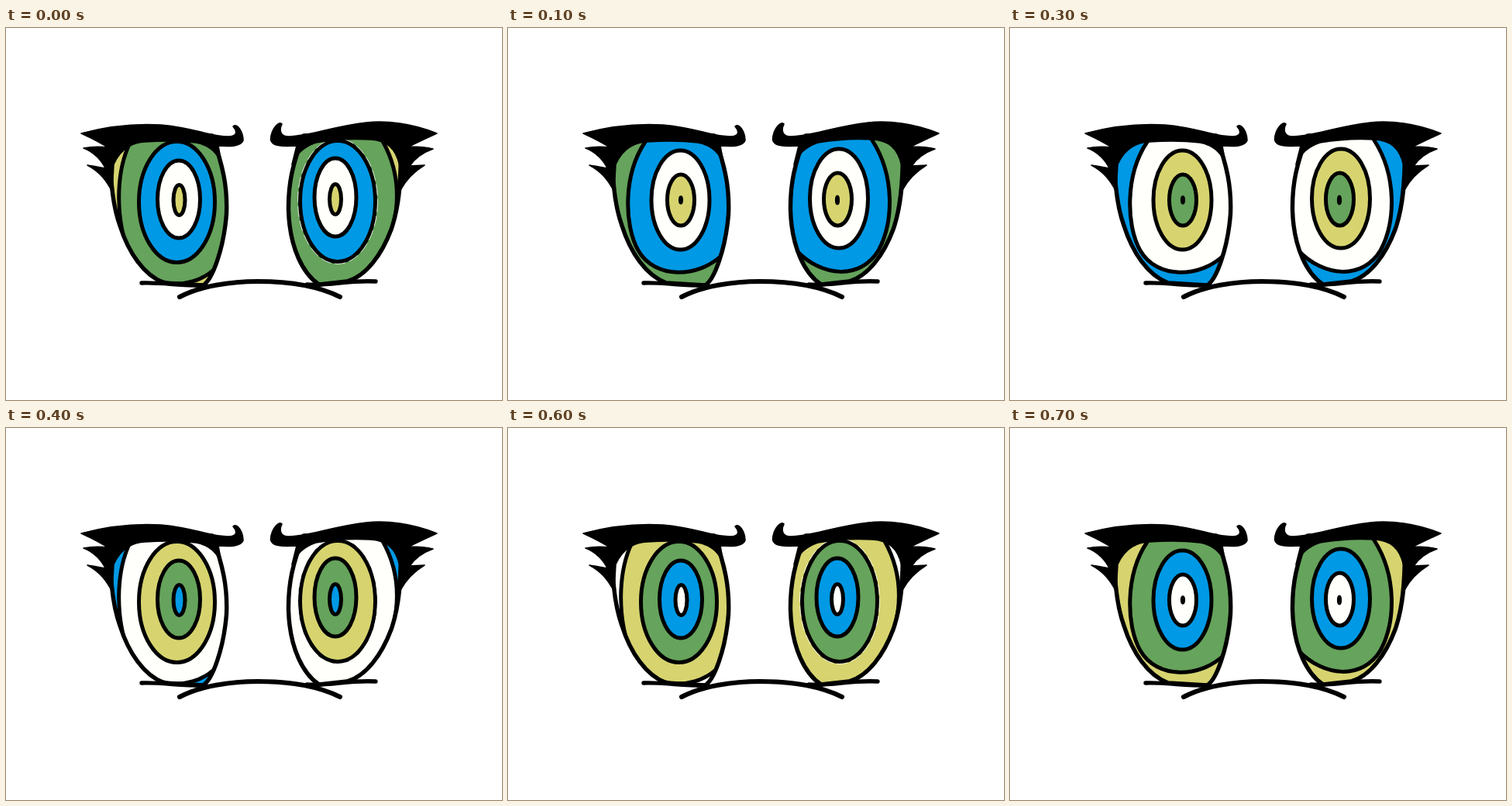
Write an HTML page without scripts that moves like this. It is 640x480 px and loops after 800 ms.

```html
<!DOCTYPE html>
<html lang="en">
<head>
<meta charset="utf-8">
<title>Hypnotic eyes</title>
<style>
  html, body { margin: 0; width: 100%; height: 100%; overflow: hidden; background: #fff; }
  svg { display: block; width: 100vw; height: 100vh; }

  .rings { stroke: #000; stroke-width: 5; }
  .line { fill: none; stroke: #000; stroke-width: 5.4; stroke-linecap: round; stroke-linejoin: round; }
  .lids { stroke: #000; stroke-width: 1.6; stroke-linejoin: round; }
  .base { stroke: none; }
  .glint { fill: none; stroke: #fff; stroke-width: .8; stroke-dasharray: 14 5; }

  /* Two ring poses alternate while the colours travel outwards. */
  .near, .far { animation: blink 200ms step-end infinite; }
  .far { animation-delay: -100ms; }
  @keyframes blink {
    0% { visibility: visible; }
    50%, 100% { visibility: hidden; }
  }

  .c0, .c1, .c2, .c3 { animation: hue 800ms step-end infinite; }
  .c1 { animation-delay: -600ms; }
  .c2 { animation-delay: -400ms; }
  .c3 { animation-delay: -200ms; }
  @keyframes hue {
    0%, 100% { fill: #d7d46f; }
    25% { fill: #66a35c; }
    50% { fill: #0099e5; }
    75% { fill: #fffffb; }
  }
</style>
</head>
<body>
<svg viewBox="0 0 640 480">
  <defs>
    <path id="eyeL" d="M135 139C133 195 138 230 147 255C158 290 178 319 204 329L254 332C266 326 281 285 284.5 240C286 205 280 178 266 139Z"/>
    <path id="eyeR" d="M509 135C511 195 507 232 497 260C485 292 465 320 440 327L404 331C384 318 366 285 364.5 235C364 200 370 175 384 139Z"/>
    <clipPath id="clipL"><use href="#eyeL"/></clipPath>
    <clipPath id="clipR"><use href="#eyeR"/></clipPath>
  </defs>

  <g class="rings" clip-path="url(#clipL)">
    <g class="near">
      <path class="base c0" d="M120 130H300V340H120Z"/>
      <path class="c3" d="M160 148C142 185 143 235 152 270C172 345 240 338 268 312L300 300V120H170Z"/>
      <ellipse class="c2" cx="220.5" cy="224.5" rx="49" ry="78"/>
      <ellipse class="c1" cx="223" cy="221" rx="27.5" ry="50"/>
      <ellipse class="c0" cx="223.5" cy="222" rx="7.5" ry="19.5"/>
    </g>
    <g class="far">
      <path class="base c3" d="M120 130H300V340H120Z"/>
      <path class="c2" d="M177 147C148 190 150 255 168 287C190 325 245 322 275 294L300 290V120H190Z"/>
      <ellipse class="c1" cx="222.5" cy="222" rx="37.5" ry="64"/>
      <ellipse class="c0" cx="223" cy="222" rx="17.5" ry="33"/>
      <ellipse cx="223" cy="222" rx=".6" ry="3.2"/>
    </g>
  </g>

  <g class="rings" clip-path="url(#clipR)">
    <g class="near">
      <path class="base c0" d="M350 130H530V340H350Z"/>
      <path class="c3" d="M486 146C508 185 508 225 498 262C485 340 400 360 350 320V120H476Z"/>
      <ellipse class="c2" cx="428" cy="223.5" rx="48.5" ry="78"/>
      <ellipse class="glint" cx="428" cy="223.5" rx="51.5" ry="81"/>
      <ellipse class="c1" cx="425" cy="218.5" rx="27" ry="50.5"/>
      <ellipse class="c0" cx="425" cy="221" rx="7.5" ry="19.5"/>
    </g>
    <g class="far">
      <path class="base c3" d="M350 130H530V340H350Z"/>
      <path class="c2" d="M470 145C499 190 498 250 478 287C455 325 405 322 372 287L350 280V120H456Z"/>
      <ellipse class="c1" cx="427" cy="220" rx="37.5" ry="64"/>
      <ellipse class="c0" cx="425.5" cy="221" rx="18" ry="34"/>
      <ellipse cx="425" cy="222" rx=".6" ry="4"/>
    </g>
  </g>

  <g class="line">
    <use href="#eyeL"/>
    <use href="#eyeR"/>
    <path d="M175 329C200 328 230 333 258 332"/>
    <path d="M388 331C420 333 440 325 477 327"/>
    <path stroke-width="6" d="M224 347C250 333 290 327 325 327C370 327 405 334 431 347"/>
  </g>

  <g class="lids">
    <path d="M97 136C130 127 165 123 200 125C245 129 262 140 287 140C298 140 299 134 293 127C299 122 306 135 306 145C303 153 290 153 274 152L278 175C272 160 262 151 245 148C220 145 195 146 180 147C165 147 148 155 139 176L137 211C130 198 122 186 105 177C113 178 122 180 128 181C124 172 114 160 100 155C110 153 122 153 131 154C122 148 108 141 97 136Z"/>
    <path d="M556 136C525 123 490 119 465 122C420 127 395 139 365 140C354 140 352 132 356 124C353 119 342 130 341.5 144C343 153 358 153 375 152L369 176C375 161 385 153 400 148C430 143 455 143 470 144C490 145 503 154 508 178L509 209C515 198 525 186 540 177C533 177 527 178 521 178C527 169 537 161 551 156C540 153 530 153 520 153C532 147 545 141 556 136Z"/>
  </g>
</svg>
</body>
</html>
```
